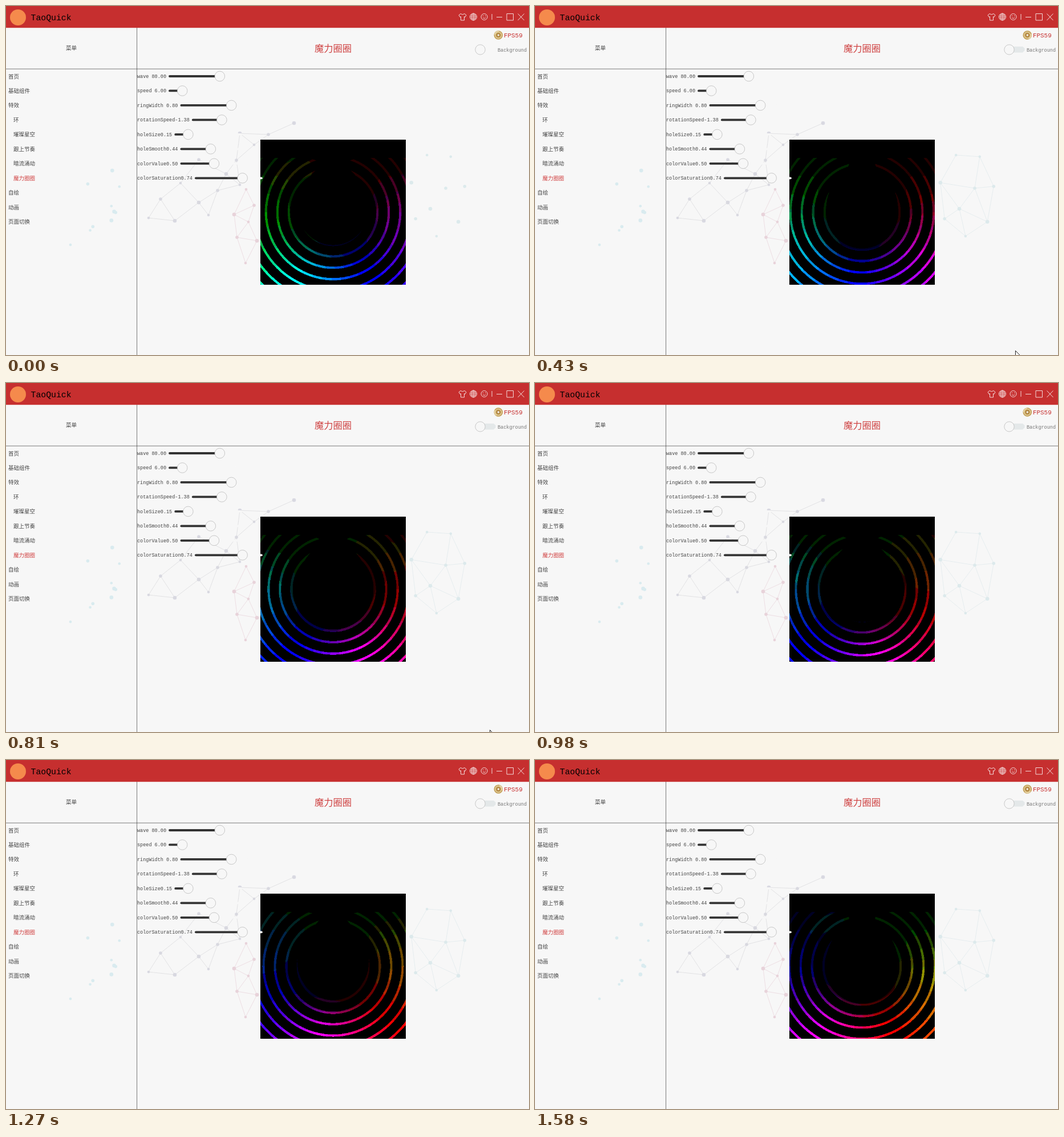
An HTML page with a canvas that plays this animation: 917x611 px, repeating every 1.67 s.

```html
<!DOCTYPE html>
<html lang="zh">
<head>
<meta charset="utf-8">
<title>TaoQuick</title>
<style>
  html, body { margin: 0; width: 100%; height: 100%; overflow: hidden; background: #f7f7f7; }
  svg, canvas { position: absolute; left: 0; top: 0; }
  #rings { left: 446px; top: 233.7px; width: 254.7px; height: 254.7px; }
  text { font-family: "Noto Sans CJK SC", "Noto Sans CJK", sans-serif; font-size: 9.5px; fill: #444; }
  .mono { font-family: "Liberation Mono", monospace; font-size: 8.5px; }
  .title { font-size: 16.3px; fill: #cf4444; }
  .icons { fill: none; stroke: #f3dada; }
  .knob { fill: #f7f7f7; stroke: #b4b4b4; stroke-width: .7; }
</style>
</head>
<body>
<svg width="917" height="611">
  <g id="net"></g>
  <path d="M0 110.2H917M229.55 38V611" stroke="#333" stroke-width=".64"/>
  <rect width="917" height="38.2" fill="#c62f2f"/>
  <circle cx="21" cy="20" r="14" fill="#f58a4c"/>
  <text class="mono" x="43.5" y="25" style="font-size:14.8px;fill:#000">TaoQuick</text>
  <g class="icons">
    <path d="M797 13.5L794 16L796 19.5L797.5 18.5V25H803.5V18.5L805 19.5L807 16L804 13.5Q800.5 16.5 797 13.5Z"/>
    <circle cx="819.5" cy="19" r="6"/>
    <ellipse cx="819.5" cy="19" rx="3" ry="6"/>
    <path d="M813.5 19H825.5M814.5 16H824.5M814.5 22H824.5M819.5 13V25"/>
    <circle cx="838.5" cy="19" r="5.5"/>
    <path d="M836 20.5Q838.5 23 841 20.5M836.5 16.5V18M840.5 16.5V18"/>
    <path d="M852 14V24M860 19.5H870M878 13.5H889.5V25H878ZM897.5 13.5L908.5 25M908.5 13.5L897.5 25"/>
  </g>
  <text x="114.5" y="77" text-anchor="middle">菜单</text>
  <text class="title" x="573.5" y="80" text-anchor="middle">魔力圈圈</text>
  <text class="mono" x="873" y="55" style="font-size:10.9px;fill:#c62f2f">FPS59</text>
  <text class="mono" x="862" y="79.5" style="fill:#777">Background</text>
  <path id="track" d="M832 71H855L858.5 74V78L855 81.5H832Z" fill="#e4e8e9"/>
  <circle class="knob" cx="831.5" cy="76.4" r="8.7"/>
  <g id="coin">
    <circle r="7.8" fill="#c39f57"/>
    <circle r="5.4" fill="none" stroke="#e0cb98" stroke-width="1.6"/>
    <path d="M-6.5 -1A6.5 6.5 0 0 1 1 -6.5" fill="none" stroke="#ead8ac" stroke-width="1.5"/>
    <circle r="3.6" fill="#b08440"/>
    <circle r="1.8" fill="#efe9dc"/>
  </g>
  <g id="menu"></g>
</svg>
<canvas id="rings" width="400" height="400"></canvas>
<svg width="917" height="611">
  <g id="sliders"></g>
  <path id="cursor" d="M0 0V14L3.2 11L5.5 16L8 15L5.8 10.2H10Z" fill="#fff" stroke="#222"/>
</svg>
<script>
const $ = id => document.getElementById(id);

function add(parent, tag, attrs, text) {
  const el = document.createElementNS('http://www.w3.org/2000/svg', tag);
  for (const key in attrs) el.setAttribute(key, attrs[key]);
  if (text) el.textContent = text;
  parent.append(el);
  return el;
}

// Dots, joined wherever two are closer than reach
function network(points, reach, dot, line) {
  let d = '';
  points.forEach(([x, y], i) => {
    for (const [u, v] of points.slice(i + 1))
      if (Math.hypot(u - x, v - y) < reach) d += `M${x} ${y}L${u} ${v}`;
    add($('net'), 'circle', { cx: x, cy: y, r: 2.3 + i % 3 * 0.5, fill: dot });
  });
  return add($('net'), 'path', { d, stroke: line, 'stroke-width': 0.7 });
}

let seed = 7;
const random = () => (seed = seed * 16807 % 2147483647) / 2147483647;

const specks = Array.from({ length: 10 }, () => [113 + 105 * random(), 280 + 150 * random()]);
network(specks, 0, '#d9ebef', 'none');

network([[250, 371], [271, 338], [296, 376], [306, 310], [338, 269], [338, 344], [355, 366], [371, 323],
  [386, 294], [410, 313], [404, 270], [410, 223], [435, 243], [460, 225], [505, 205]], 58, '#d9d9e2', '#d8d8dc');

network([[421, 321], [435, 349], [400, 365], [425, 378], [405, 405], [440, 411], [420, 450]], 50, '#e8d3da', '#e9d3da');

const oval = Array.from({ length: 7 }, (_, i) => {
  const a = (i - 1.2) * 2 * Math.PI / 7;
  return [757 + 48 * Math.cos(a), 329 + 74 * Math.sin(a)];
});
const lateLines = network([...oval, [771, 319], [744, 355]], 66, '#dceaec', '#dfe9eb');

const rowY = i => 123 + 25.47 * i;

const menu = ['首页', '基础组件', '特效', '环', '璀璨星空', '跟上节奏', '暗流涌动', '魔力圈圈', '自绘', '动画', '页面切换'];
menu.forEach((label, i) => add($('menu'), 'text', {
  x: i > 2 && i < 8 ? 13 : 4, y: rowY(i) + 3.5, style: i === 7 ? 'fill:#d04040' : ''
}, label));

const wave = 80, speed = 6, ringWidth = 0.8, spin = -1.38, holeSize = 0.15, holeSmooth = 0.44;

let row = 0;
function slider(name, value, max = 1, min = 0) {
  const g = $('sliders'), y = rowY(row++);
  const label = name + value.toFixed(2);
  const x = 234 + 5.1 * label.length;
  const knob = x + 9 + 101 * (value - min) / (max - min);
  const bar = (end, stroke) => add(g, 'path', {
    d: `M${x + 2} ${y}H${end}`, stroke, 'stroke-width': 3.8, 'stroke-linecap': 'round'
  });
  add(g, 'text', { class: 'mono', x: 230, y: y + 2.8 }, label);
  bar(x + 117, '#f7f7f7');
  bar(knob - 8, '#333');
  add(g, 'circle', { class: 'knob', cx: knob, cy: y, r: 8.8 });
}
slider('wave ', wave, 100);
slider('speed ', speed, 40);
slider('ringWidth ', ringWidth);
slider('rotationSpeed', spin, 10, -10);
slider('holeSize', holeSize);
slider('holeSmooth', holeSmooth);
slider('colorValue', 0.5);
slider('colorSaturation', 0.74);

const size = $('rings').width;
const ctx = $('rings').getContext('2d');
const img = ctx.createImageData(size, size);
const clamp = x => Math.max(0, Math.min(1, x));

function smoothstep(a, b, x) {
  const t = clamp((x - a) / (b - a));
  return t * t * (3 - 2 * t);
}

// Three bits per channel
const level = x => Math.min(7, Math.floor(x * 8)) * 255 / 7;

function channel(n, hue, value) {
  const k = (n + hue) % 6;
  return level(value * (1 - clamp(Math.min(k, 4 - k))));
}

function drawRings(sec) {
  const px = img.data;
  for (let y = 0, i = 0; y < size; y++) {
    for (let x = 0; x < size; x++, i += 4) {
      const u = (x + 0.5) / size - 0.5, v = (y + 0.5) / size - 0.5;
      const d = Math.sqrt(u * u + v * v);
      px[i] = px[i + 1] = px[i + 2] = 0;
      px[i + 3] = 255;
      if (Math.cos(wave * d - speed * sec - 5.5) < ringWidth) continue;
      const value = (v + 0.5) * smoothstep(holeSize, holeSmooth, d);
      const angle = 5 * Math.PI / 3 - Math.atan2(v, u) - spin * sec;
      const hue = (angle * 3 / Math.PI + 12) % 6;
      px[i] = channel(5, hue, value);
      px[i + 1] = channel(3, hue, value);
      px[i + 2] = channel(1, hue, value);
    }
  }
  ctx.putImageData(img, 0, 0);
}

const show = (el, on) => el.style.visibility = on ? 'visible' : 'hidden';

function draw(t) {
  drawRings(t / 1000);
  show(lateLines, t > 0);
  show($('track'), t > 0);
  $('coin').setAttribute('transform', `translate(863.3 51) rotate(${t * 0.36})`);
  const k = (t - 430) / 380;
  $('cursor').setAttribute('transform', `translate(${842.5 + 6 * k} ${603.5 + 4 * k})`);
  show($('cursor'), t > 340 && t < 950);
}

// The picture moves on in even steps; the last one is held longer
const loop = 1670, hold = 76.7, lead = 37, last = 21;
const start = performance.now();
let shown = -1;

function tick() {
  const now = (performance.now() - start) % loop;
  const step = Math.min(last, Math.floor((now + lead) / hold));
  if (step !== shown) {
    shown = step;
    draw(Math.max(0, step * hold - lead + 4));
  }
  requestAnimationFrame(tick);
}
draw(0);
tick();
</script>
</body>
</html>
```
